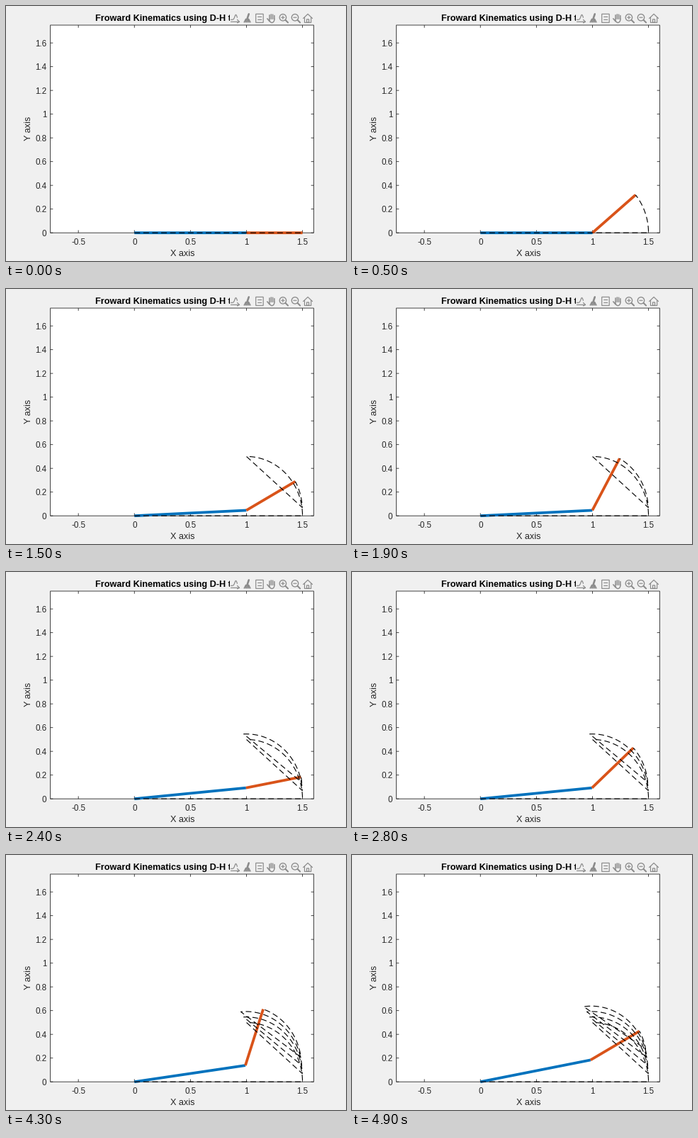
Animation, 480 px wide and 360 px high, one loop 5000 ms. Source, as a matplotlib script:

```python
import numpy as np
import matplotlib.pyplot as plt
from matplotlib.animation import FuncAnimation
from matplotlib.patches import Circle, Rectangle

WIDTH, HEIGHT, DPI = 480, 360, 100
FRAMES, INTERVAL = 50, 100
STEPS_PER_FRAME = 3
SWEEP = 35                                   # steps of each joint from 0 to 90 degrees
ANGLES = np.linspace(0, np.pi / 2, SWEEP)
LINK1, LINK2 = 1.0, 0.5

X_MIN, X_MAX, Y_MAX = -0.75, 1.6, 1.75
LEFT, RIGHT, TOP, BOTTOM = 62.6, 434.4, 27.0, 320.2
PANEL, INK, ICON = "#f0f0f0", "#262626", "#8a8a8a"
BLUE, ORANGE = "#0072bd", "#d95319"
ICON_Y, ICON_STEP = 17.3, 17.1

plt.rcParams["font.family"] = "Liberation Sans"
plt.rcParams["lines.scale_dashes"] = False

fig = plt.figure(figsize=(WIDTH / DPI, HEIGHT / DPI), dpi=DPI, facecolor=PANEL)
ax = fig.add_axes([0, 0, 1, 1])
ax.set(xlim=(0, WIDTH), ylim=(HEIGHT, 0))
ax.axis("off")


def pt(px):
    return px * 72 / DPI


def to_px(x, y):
    sx = (RIGHT - LEFT) / (X_MAX - X_MIN)
    sy = (BOTTOM - TOP) / Y_MAX
    return LEFT + (np.asarray(x) - X_MIN) * sx, BOTTOM - np.asarray(y) * sy


def stroke(xs, ys, color=INK, width=0.86, **style):
    style.setdefault("solid_capstyle", "butt")
    return ax.plot(xs, ys, color=color, lw=pt(width), snap=False, **style)[0]


def box(x, y, w, h, **style):
    ax.add_patch(Rectangle((x, y), w, h, snap=False, **style))


def label(x, y, text, size=11.6, **style):
    style = {"color": INK, "ha": "center", "va": "baseline", **style}
    ax.text(x, y, text, fontsize=pt(size), **style)


def draw_axes():
    tick = 3.7
    box(LEFT, TOP, RIGHT - LEFT, BOTTOM - TOP, fc="white", ec=INK, lw=pt(0.86))
    for value in np.arange(-0.5, 1.6, 0.5):
        x, _ = to_px(value, 0)
        stroke([x, x], [BOTTOM, BOTTOM - tick])
        stroke([x, x], [TOP, TOP + tick])
        label(x, 336.7, f"{value:g}")
    for i in range(9):
        _, y = to_px(0, i / 5)
        stroke([LEFT, LEFT + tick], [y, y])
        stroke([RIGHT, RIGHT - tick], [y, y])
        label(57.2, y + 4.5, f"{i / 5:g}", ha="right")
    label(248.9, 353.4, "X axis", 12.57)
    label(34.6, 173.3, "Y axis", 12.57, rotation=90, rotation_mode="anchor")
    label(125.8, 21.3, "Froward Kinematics using D-H t", 12.57,
          weight="bold", color="black", ha="left")


def icon_line(cx, xs, ys, width=1.2):
    stroke(cx + np.asarray(xs), ICON_Y + np.asarray(ys), ICON, width, zorder=6,
           solid_capstyle="round", solid_joinstyle="round")


def icon_box(cx, x, y, w, h, fc="none"):
    box(cx + x, ICON_Y + y, w, h, fc=fc, ec=ICON, lw=pt(1.2), zorder=6)


def export_icon(cx):
    x = np.linspace(-6, 3, 20)
    icon_line(cx, x, 2 - 7 * np.exp(-((x - 1) / 2.2) ** 2))
    icon_line(cx, [-6, 6], [5, 5])
    icon_line(cx, [3, 6, 3], [2, 5, 6.5])


def brush_icon(cx):
    icon_line(cx, [2.2, 0.2], [-6, 0], 2.6)
    for spread in np.linspace(-1, 1, 6):
        icon_line(cx, [2 * spread, 4.4 * spread], [1, 5.6], 1.5)


def tip_icon(cx):
    icon_box(cx, -5, -6, 10.5, 12)
    for y in (-2, 2):
        icon_line(cx, [-2, 3], [y, y])


def hand_icon(cx):
    for i in range(4):
        x = -2.8 + 2.3 * i
        icon_line(cx, [x, x], [1, -5.6 + 0.6 * (i - 1.3) ** 2], 1.5)
    palm = np.linspace(0, np.pi, 20)
    icon_line(cx, 0.6 + 3.6 * np.cos(palm), 1 + 5.2 * np.sin(palm), 1.4)
    icon_line(cx, [-6, -2.6], [0.5, 4.5], 1.6)


def zoom_icon(cx, plus=False):
    ax.add_patch(Circle((cx - 1, ICON_Y - 1.1), 4.7, fill=False, ec=ICON,
                        lw=pt(1.3), zorder=6))
    icon_line(cx, [2.6, 6.2], [2.5, 6.1], 2)
    icon_line(cx, [-3.2, 1.2], [-1.1, -1.1])
    if plus:
        icon_line(cx, [-1, -1], [-3.3, 1.1])


def home_icon(cx):
    icon_line(cx, [-6.5, 0, 6.5], [0.2, -6, 0.2])
    icon_line(cx, [-4.6, -4.6, 4.6, 4.6], [-1, 6, 6, -1])
    icon_box(cx, -1.5, 1.5, 3, 4.5)


def draw_toolbar():
    box(316, 8, 118, 18, fc=PANEL, ec="none", zorder=5)
    icons = (export_icon, brush_icon, tip_icon, hand_icon,
             lambda cx: zoom_icon(cx, plus=True), zoom_icon, home_icon)
    for i, draw in enumerate(icons):
        draw(323.5 + i * ICON_STEP)


def pose(step):
    a = ANGLES[step // SWEEP]
    b = a + ANGLES[step % SWEEP]
    elbow = LINK1 * np.cos(a), LINK1 * np.sin(a)
    tip = elbow[0] + LINK2 * np.cos(b), elbow[1] + LINK2 * np.sin(b)
    return elbow, tip


draw_axes()
draw_toolbar()
upper = stroke([], [], BLUE, 3.8, zorder=3)
fore = stroke([], [], ORANGE, 3.8, zorder=3.1)
trail = stroke([], [], "black", 1.15, zorder=4, dashes=(pt(8), pt(4.6)),
               dash_capstyle="butt", dash_joinstyle="round")


def update(frame):
    step = frame * STEPS_PER_FRAME
    elbow, tip = pose(step)
    upper.set_data(*to_px([0, elbow[0]], [0, elbow[1]]))
    fore.set_data(*to_px([elbow[0], tip[0]], [elbow[1], tip[1]]))
    path = np.array([(0, 0)] + [pose(s)[1] for s in range(step + 1)])
    trail.set_data(*to_px(*path.T))
    return upper, fore, trail


anim = FuncAnimation(fig, update, frames=FRAMES, interval=INTERVAL,
                     repeat=True, repeat_delay=0, blit=False)
plt.show()
```
